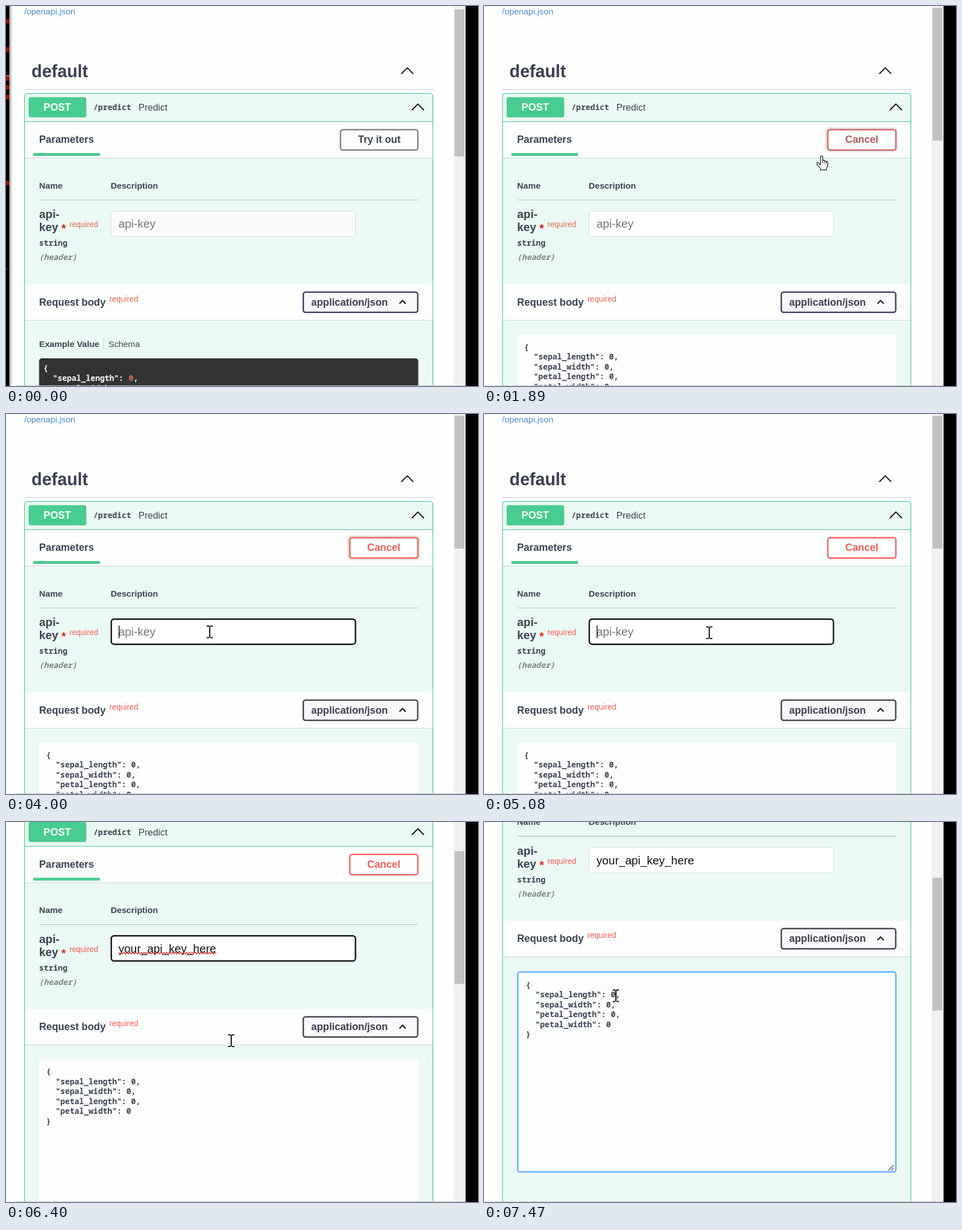
An HTML page with a canvas that plays this animation: 834x672 px, repeating every 8000 ms.

```html
<!DOCTYPE html>
<html lang="en">
<head>
<meta charset="utf-8">
<title>API docs demo</title>
<style>
  html, body { margin: 0; width: 100%; height: 100%; overflow: hidden; background: #fff; }
  canvas { display: block; }
</style>
</head>
<body>
<canvas id="stage" width="834" height="672"></canvas>
<script>
const ctx = document.getElementById('stage').getContext('2d');
const W = 834, H = 672, LOOP = 8000;
const SANS = '"Liberation Sans", Arial, sans-serif';
const MONO = '"Noto Sans Mono", "DejaVu Sans Mono", monospace';
const INK = '#3b4151', GREEN = '#49cc90';

// Event times in ms
const CLICK_TRY = 1690, FOCUS_KEY = 4000, PASTE = 5360, SCROLL = 6090, FOCUS_BODY = 7470;
const SCROLL_END = 317.5;

// Pointer hot spot: time, x, y
const TRACK = [
  [70, 258, 364], [300, 393, 251], [480, 460, 318], [650, 530, 293], [820, 599, 283],
  [890, 602, 278], [1230, 626, 247], [1430, 636, 243], [1690, 636, 243],
  [2440, 413, 364], [2700, 413, 364], [2840, 413, 367], [3250, 407, 384], [3670, 407, 384],
  [3800, 358, 385], [4000, 360, 385], [4630, 398, 386.5], [6930, 398, 386.5], [7470, 233, 307]
];

const ARROW = new Path2D('M0 0V16L4 12.5L6.5 18.5L9 17.4L6.5 11.6H11.5Z');
const HAND = new Path2D('M-2 2Q0-1 2 2V9Q4 7 5.5 10Q7.5 8.3 8.5 11Q11 10 11 13V18L8.5 22.5V25.5H-2V23L-8 15.5Q-9 11.5-6 12.5L-2 16.5Z');

const smooth = u => u * u * (3 - 2 * u);

function pointerAt(t) {
  for (let i = 1; i < TRACK.length; i++) {
    const [t0, x0, y0] = TRACK[i - 1], [t1, x1, y1] = TRACK[i];
    if (t <= t1) {
      const u = smooth((t - t0) / (t1 - t0));
      return [x0 + (x1 - x0) * u, y0 + (y1 - y0) * u];
    }
  }
  return TRACK[TRACK.length - 1].slice(1);
}

function scrollAt(t) {
  if (t < SCROLL) return 0;
  return SCROLL_END * smooth(Math.min(1, (t - 5993) / 807));
}

function text(str, x, y, size, color = INK, style = 'bold', family = SANS) {
  ctx.font = `${style} ${size}px ${family}`;
  ctx.fillStyle = color;
  ctx.fillText(str, x, y);
}

const code = (str, x, y, color = INK, style = 'bold') => text(str, x, y, 13.9, color, style, MONO);

function rect(x, y, w, h, color) {
  ctx.fillStyle = color;
  ctx.fillRect(x, y, w, h);
}

function box(x0, y0, x1, y1, r, fill, stroke, width = 1) {
  ctx.beginPath();
  ctx.roundRect(x0, y0, x1 - x0, y1 - y0, r);
  if (fill) { ctx.fillStyle = fill; ctx.fill(); }
  if (stroke) { ctx.strokeStyle = stroke; ctx.lineWidth = width; ctx.stroke(); }
}

function line(points, color, width) {
  ctx.beginPath();
  points.forEach(([x, y]) => ctx.lineTo(x, y));
  ctx.strokeStyle = color;
  ctx.lineWidth = width;
  ctx.stroke();
}

const chevron = (x, y, w, h, color, width) =>
  line([[x - w, y + h], [x, y - h], [x + w, y + h]], color, width);

function band(y0, y1) {
  rect(33, y0, 721, y1 - y0, '#fbfefd');
  rect(33, y1, 721, 1, '#d3dfdb');
  rect(33, y1 + 1, 721, 1, '#e1eee9');
}

function button(label, x0, textX, edge, ink, glow) {
  if (glow) box(x0 - 1, 217, 729, 256, 5, null, 'rgba(0,0,0,.1)', 5);
  box(x0 + 1, 218.7, 727.7, 254.7, 4, '#fdfefe', edge, 2.5);
  text(label, textX, 242.3, 17.8, ink);
}

function keyField(t) {
  const focused = t >= FOCUS_KEY && t < FOCUS_BODY;
  if (focused) box(186, 362.7, 617.5, 407.2, 5, '#fff', '#111', 2.5);
  else box(185.5, 362.5, 617.5, 407.5, 5, t < CLICK_TRY ? '#fafafa' : '#fff', '#d6dad9');

  if (t < PASTE) text('api-key', 198.7, 392, 20.3, '#757575', '');
  else text('your_api_key_here', 198.7, 392, 20.3, '#111', '');
  if (!focused) return;

  if (t >= PASTE) {
    const wave = [];
    for (let x = 199; x <= 372; x += 2.5) wave.push([x, 393.3 + (wave.length % 2 ? 1.5 : -1.5)]);
    line(wave, '#e02020', 1.1);
  }
  const since = t < PASTE ? t - FOCUS_KEY : t - PASTE;
  if (Math.floor(since / 535) % 2 === 0) rect(t < PASTE ? 199 : 371.5, 374, 1.5, 22.5, '#111');
}

function exampleBox() {
  text('Example Value', 58.5, 603, 15.2);
  rect(172, 589, 1, 18, '#c4cccb');
  text('Schema', 181, 603, 15.2, INK, '');
  box(58.5, 623, 728.5, 900, 5, '#333');
  code('{', 66, 645, '#fff');
  code('  "sepal_length":', 66, 663, '#fff');
  code('0', 216.8, 663, '#d96a62');
  code(',', 225.2, 663, '#fff');
  code('  "sepal_width":', 66, 680.5, '#fff');
}

function bodyEditor(t) {
  const focused = t >= FOCUS_BODY;
  const x = focused ? 74 : 71, y = focused ? 610 : 607.5;
  if (focused) box(59.7, 582.7, 727.7, 936.3, 4, '#fbfefd', '#61affe', 2.5);
  else box(58.5, 581, 728.5, 937, 5, '#fcfefd');
  const fields = ['sepal_length', 'sepal_width', 'petal_length', 'petal_width'];
  const rows = ['{', ...fields.map((f, i) => `  "${f}": 0${i < 3 ? ',' : ''}`), '}'];
  rows.forEach((row, i) => code(row, x, y + i * 17.55));
  if (focused) {
    rect(233, 615.5, 1.2, 16, '#222');
  }
  line([[714.5, 933.5], [723.5, 924.5]], '#444', 1.1);
  line([[719.5, 933.5], [724, 929]], '#444', 1.1);
}

function page(t) {
  const tried = t >= CLICK_TRY, vivid = t >= FOCUS_KEY;
  const warn = vivid ? '#fb5b52' : '#e8694f';

  text('/openapi.json', 32, 15, 15.2, '#4990c8', '');
  text('default', 45, 126, 30.5);
  chevron(709, 114.7, 10.5, 5.3, '#111', 2);
  rect(32, 147, 723, 1, '#c4c7cb');

  box(32.7, 154.7, 754.3, 1400, 5, '#ebf9f4');
  rect(33, 204, 721, 1.2, GREEN);
  box(40, 161.3, 141.8, 197, 4, GREEN);
  text('POST', 66.3, 185.3, 17.8, '#fff');
  code('/predict', 154.5, 184.3);
  text('Predict', 234, 185.2, 16.5, INK, '');
  chevron(727.8, 178.8, 10.7, 5.4, '#111', 2);

  band(205.2, 268);
  text('Parameters', 58.5, 242.3, 17.8);
  rect(48.3, 260, 117.7, 5, GREEN);
  if (!tried) button('Try it out', 590, 622, '#818283', INK);
  else if (vivid) button('Cancel', 606.5, 638.3, '#f9605c', '#f25c59', t < 4100);
  else button('Cancel', 606.5, 638.3, '#cf6665', '#b8525a', true);

  text('Name', 58.5, 322.7, 15.2);
  text('Description', 185, 322.7, 15.2);
  rect(58.5, 342.5, 670, 1, '#b0bcba');

  text('api-', 58.5, 375, 20.3);
  text('key', 58.5, 398.3, 20.3);
  text('*', 98, 400, 20.3, vivid ? '#e8241c' : '#c4201c');
  text('required', 112, 391, 13.9, warn, '');
  code('string', 58.5, 424);
  code('(header)', 58.5, 449, '#7c8183', 'italic bold');
  keyField(t);

  band(492, 555);
  text('Request body', 58.5, 529.5, 17.8);
  text('required', 182.7, 522.7, 13.9, warn, '');
  box(525.3, 506, 727.5, 541.7, 4, '#f8f7f9', vivid ? '#41444e' : '#3d3f58', 2.5);
  text('application/json', 539.3, 529.5, 17.8);
  chevron(700.7, 523.7, 5.5, 2.8, '#222', 2.3);

  if (tried) bodyEditor(t);
  else exampleBox();
  box(32.7, 154.7, 754.3, 1400, 5, null, '#55ce97', 1.3);
}

function frameEdges(t, scroll) {
  const tried = t >= CLICK_TRY;
  rect(791, 0, 21, H, '#f1f1f1');
  if (tried) rect(792.5, 3.3 + scroll * 0.3, 17.5, 234.7, '#c1c1c1');
  else rect(792.5, 6, 17.5, 260, '#c1c1c1');
  rect(17, 671, 795, 1, '#c9cccb');
  rect(812, 0, W - 812, H, '#000');
  if (tried) return;

  rect(0, 0, 6, H, '#000');
  const shade = ctx.createLinearGradient(6, 0, 12, 0);
  shade.addColorStop(0, '#aaa');
  shade.addColorStop(1, '#fff');
  rect(6, 0, 6, H, shade);
  [23, 73, 124, 140, 157, 309].forEach(y => rect(0, y, 6, 8, '#8e1010'));
  rect(0, 122.5, 6, 1.5, '#aaa');
  rect(0, 465, 6, 1, '#444');
}

function pointer(t) {
  if (t < 70) return;
  const [x, y] = pointerAt(t);
  ctx.save();
  ctx.translate(x, y);
  if (t < 3900) {
    const shape = t < 1100 ? ARROW : HAND;
    ctx.fillStyle = '#fff';
    ctx.fill(shape);
    ctx.strokeStyle = '#111';
    ctx.lineWidth = 1.2;
    ctx.stroke(shape);
    if (shape === HAND) [2, 5.3, 8.3].forEach((fx, i) => rect(fx - 0.4, 9 + i, 0.9, 4.5, '#111'));
  } else {
    rect(-1, -10, 2, 20, '#111');
    rect(-5.5, -11, 4.5, 2, '#111');
    rect(1, -11, 4.5, 2, '#111');
    rect(-5.5, 9.5, 4.5, 2, '#111');
    rect(1, 9.5, 4.5, 2, '#111');
  }
  ctx.restore();
}

function draw(t) {
  const scroll = scrollAt(t);
  rect(0, 0, W, H, '#fefefe');
  ctx.save();
  ctx.translate(0, -scroll);
  page(t);
  ctx.restore();
  frameEdges(t, scroll);
  pointer(t);
}

const start = performance.now();
function tick() {
  draw((performance.now() - start) % LOOP);
  requestAnimationFrame(tick);
}
tick();
</script>
</body>
</html>
```
